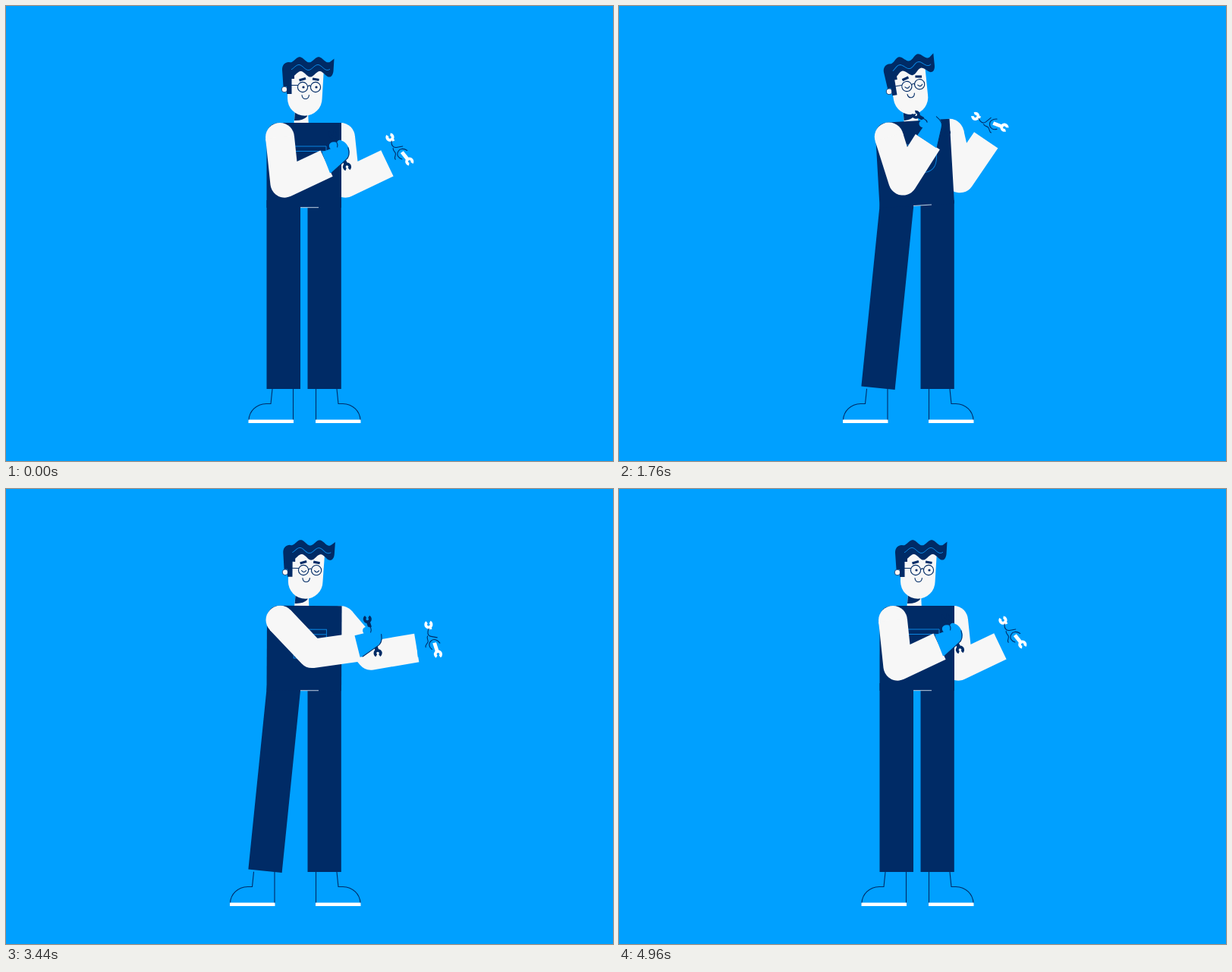
An HTML page for the animation above (5.04 s loop, 800 by 600 pixels).

```html
<!DOCTYPE html>
<html lang="en">
<head>
<meta charset="utf-8">
<title>Handyman</title>
<style>
html, body { margin: 0; width: 100%; height: 100%; overflow: hidden; background: #00a0ff; }
svg { display: block; width: 100%; height: 100%; }
.sky { fill: #00a0ff; }
.navy { fill: #002b66; }
.white { fill: #f7f7f7; }
.line { fill: none; stroke: #002b66; stroke-width: 1.1; stroke-linecap: round; }
.thin { fill: none; stroke: #0a84e0; stroke-width: 1; }
.arm { fill: none; stroke: #f7f7f7; stroke-width: 38; stroke-linejoin: round; }
</style>
</head>
<body>
<svg id="stage" viewBox="0 0 800 600"></svg>
<script>
const LOOP = 5040, STEP = 80, LIMB = 61, RAD = Math.PI / 180;

// Arms are [upper, fore, hand] angles; head is [x, y, tilt]
const rest  = { lean: 0,    head: [0, 0, 0],      near: [84, -25.3, 4], far: [84, -25.5, 0] };
const think = { lean: -3.6, head: [2, 2.5, -6.5], near: [74, -60.5, 2], far: [77, -58.4, 0] };
const show  = { lean: .3,   head: [0, 0, .3],     near: [46.5, -8, -6], far: [49.5, -9.5, 5] };
const bow   = { lean: 1.8,  head: [-4, 1.5, 9.5], near: [57, -14.2, 2], far: [49.4, -3.5, 0] };

const MOVES = [
  { from: 80,   to: 1360, a: rest,  b: think },
  { from: 1680, to: 2240, a: think, b: show },
  { from: 3520, to: 4080, a: show,  b: bow },
  { from: 4080, to: 4520, a: bow,   b: rest }
];

const clamp = u => Math.max(0, Math.min(1, u));
const smooth = u => u * u * (3 - 2 * u);
const ease = (t, from, to) => smooth(clamp((t - from) / (to - from)));
const mix = (a, b, u) => a + (b - a) * u;
const bump = (t, mid, half) => Math.cos(clamp(Math.abs(t - mid) / half) * Math.PI / 2) ** 2;

// Value picked from the poses at time t; lead > 1 finishes a move sooner
function pose(t, pick, lead = 1) {
  const { from, to, a, b } = MOVES.findLast(m => t >= m.from) || MOVES[0];
  return mix(pick(a), pick(b), smooth(clamp((t - from) / (to - from) * lead)));
}

// Hair curve with crests 25 apart
function wave(x0, x1, crest, y, size) {
  const points = [];
  const dir = Math.sign(x1 - x0);
  for (let x = x0; (x1 - x) * dir >= 0; x += dir) {
    points.push(`${x} ${(y - size * Math.cos((x - crest) * Math.PI / 12.5)).toFixed(2)}`);
  }
  return points.join("L");
}

function wrench(x1, y1, x2, y2, color) {
  const turn = Math.atan2(y2 - y1, x2 - x1) / RAD - 90, size = Math.hypot(x2 - x1, y2 - y1);
  const jaw = `<path d="M2-3.1A3.700 3.700 0 1 1-2-3.100" stroke-width="3.8"/>`;
  return `<g transform="translate(${x1} ${y1}) rotate(${turn})" fill="none" stroke="${color}">
    <g transform="rotate(14)">${jaw}</g>
    <g transform="translate(0 ${size}) rotate(194)">${jaw}</g>
    <path d="M0 3V${size - 3}" stroke-width="4.8"/></g>`;
}

const shoe = `<path class="line" d="M351 505L349 524.5H343C330 525 320.5 534 320 546M378.5 505V546"/>
  <path fill="#fff" d="M319.5 545.6H379V550H319.5Z"/>`;

const eye = x => `<circle class="line" cx="${x}" cy="107" r="6.6"/>
  <circle class="open navy" cx="${x + 1}" cy="107" r="1.6"/>
  <path class="shut line" d="M${x - 2.5} 107.500q3 4 6 0"/>`;

const head = `
  <path class="white" d="M381 138H398L399 160H379Z"/>
  <path class="navy" d="M381 139H399L396.5 146Q391 151.500 380 151Z"/>
  <path class="white" d="M372 82H419L416.600 122A22.800 22.800 0 0 1 371 122V110Z"/>
  <circle class="white" cx="367" cy="110" r="3.8" stroke="#002b66" stroke-width=".8"/>
  <path class="navy" d="M370 116H376.500V96H380L${wave(380, 428, 388.5, 89.8, 3.8)}Q431 91 431.500 86L432.500 69.500
    L${wave(427, 375, 387, 70.8, 3.6)}L372 74C366 75 364 79 364 84L365.500 106H370Z"/>
  <path class="thin" d="M${wave(376, 427, 386, 81, 3.5)}"/>
  <path class="line" d="M371 104.500H384.500M398 106Q399.700 103.800 401.700 106M390 117.500q.5 5 4.700 5t4.700-5"/>
  ${eye(391)}${eye(408)}
  <path d="M386.500 98L395 95.500M404 96L412.500 97.500" stroke="#002b66" stroke-width="3.2"/>`;

const torso = `
  <path class="navy" d="M361 154H442V266H343.500V173Q343.500 154 361 154Z"/>
  <path class="thin" d="M379 185H422V204Q421 223 402 223H379ZM379 191.500H422"/>
  <path d="M388 265.700H412" stroke="#c3d1e3"/>`;

const arm = id => `<circle id="${id}Cap" class="white" r="19"/><path id="${id}Arm" class="arm"/>`;

const nearHand = wrench(21, -33, 23.5, 14, "#002b66") + `
  <path class="sky" d="M-.5-16L12-16C10-19 12-24 17-23.500Q21-23 22.500-20.500C24-23 28-24 30-20
    C34-17 37-6 32 0Q29 4 25 5L3 13.500H-.5Z"/>
  <path class="line" d="M34-9Q33 3 25 5L3 13.500M22.500-20.500Q23-17 21-15"/>`;

const farHand = wrench(18, -29.5, 27.5, 10.5, "#fff") + `
  <path class="sky" d="M.5-15L11-23H25L30-6L19-4L3 12H.5Z"/>
  <path class="line" d="M18-24C15-20 15.500-15 20-13.700T28-11.500M15.500-14.500
    C13.500-11 17-9 15-6S11-2 12 0M31-4C28-9 23-10.500 20-8C15.500-5 16 0 20 3.500"/>`;

const stage = document.getElementById("stage");
stage.innerHTML = `
  <rect class="sky" width="800" height="600"/>
  ${arm("far")}<g id="farHand">${farHand}</g>
  <g id="shoe">${shoe}</g>
  <g transform="translate(787 0) scale(-1 1)">${shoe}</g>
  <path id="leg" class="navy" d="M343.500 256H388V505H343.500Z"/>
  <path class="navy" d="M397.500 256H441.800V505H397.500Z"/>
  <g id="body"><g id="head">${head}</g>${torso}</g>
  ${arm("near")}<g id="nearHand">${nearHand}</g>`;

const el = {};
for (const node of stage.querySelectorAll("[id]")) el[node.id] = node;
const move = (id, value) => el[id].setAttribute("transform", value);
const reveal = (name, on) => {
  for (const node of stage.querySelectorAll("." + name)) node.style.display = on ? "" : "none";
};

function drawArm(id, [x, y], upper, fore, hand) {
  const ex = x + LIMB * Math.cos(upper * RAD), ey = y + LIMB * Math.sin(upper * RAD);
  const wx = ex + LIMB * Math.cos(fore * RAD), wy = ey + LIMB * Math.sin(fore * RAD);
  move(id + "Cap", `translate(${x} ${y})`);
  el[id + "Arm"].setAttribute("d", `M${x} ${y}L${ex} ${ey}L${wx} ${wy}`);
  move(id + "Hand", `translate(${wx} ${wy}) rotate(${fore + hand})`);
}

function draw(t) {
  const lean = pose(t, p => p.lean, 1.2);
  const [hx, hy, tilt] = [0, 1, 2].map(i => pose(t, p => p.head[i], 1.2));
  const drop = 3 * bump(t, 560, 400) - 3 * bump(t, 1680, 320);
  const stride = ease(t, 80, 680) - ease(t, 3520, 4080);

  const cos = Math.cos(lean * RAD), sin = Math.sin(lean * RAD);
  const shoulder = x => [393 + (x - 393) * cos + 92 * sin, 265 + drop + (x - 393) * sin - 92 * cos];

  move("shoe", `translate(${-24.5 * stride} 0)`);
  move("leg", `rotate(${5.8 * stride} 366 265)`);
  move("body", `translate(0 ${drop}) rotate(${lean} 393 265)`);
  move("head", `translate(${hx} ${hy + drop * .6}) rotate(${tilt} 391 150)`);

  const near = [0, 1, 2].map(i => pose(t, p => p.near[i]));
  const far = [130, 0, 0].map((lag, i) => pose(t - lag, p => p.far[i]));
  drawArm("near", shoulder(361), ...near);
  drawArm("far", shoulder(441), ...far);

  const closed = t >= 320 && t < 4400;
  reveal("open", !closed);
  reveal("shut", closed);
}

const start = performance.now();
function tick() {
  const t = (performance.now() - start) % LOOP;
  draw(Math.floor(t / STEP) * STEP);
  requestAnimationFrame(tick);
}
tick();
</script>
</body>
</html>
```
